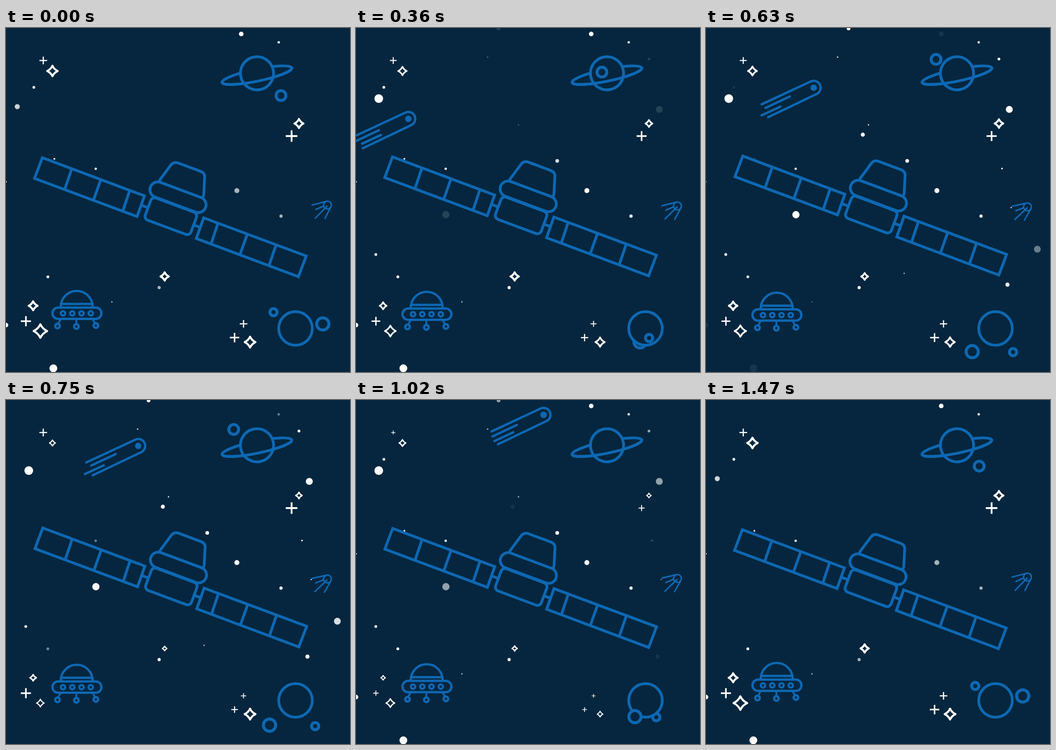
Animation, 748 px wide and 748 px high, one loop 1.5 s. Source, as an HTML page:

```html
<!DOCTYPE html>
<html lang="en">
<head>
<meta charset="utf-8">
<title>Satellite in space</title>
<style>
  html, body { margin: 0; width: 100%; height: 100%; overflow: hidden; background: #05263e; }
  svg { display: block; width: 100vw; height: 100vh; }
  .line { fill: none; stroke: #0d68b3; }
  .solid { fill: #05263e; }
</style>
</head>
<body>
<svg viewBox="0 0 748 748">
  <g id="stars" fill="#fff"></g>
  <g id="sparks" fill="none" stroke="#fff" stroke-linejoin="round"></g>

  <g id="comet" class="line" stroke-width="5" stroke-linecap="round">
    <path d="M-113 36L-6.4 -13.6A15 15 0 0 1 6.4 13.6L-99 64"/>
    <path id="trailA" d="M-109 46L-56 21"/>
    <path id="trailB" d="M-109 58L-68 39"/>
    <circle r="7" fill="#0d68b3" stroke="none"/>
  </g>

  <g id="ringed" class="line" stroke-width="6">
    <g transform="translate(545.6 102.6) rotate(-11.7)">
      <ellipse rx="77.500" ry="13"/>
      <circle class="solid" cx="1" cy="-4" r="36"/>
      <path d="M-77.500 0A77.500 13 0 0 0 77.500 0"/>
    </g>
  </g>

  <g id="plain" class="line" stroke-width="6">
    <circle class="solid" cx="629.500" cy="653.300" r="36.500"/>
  </g>

  <g id="probe" class="line" stroke-width="3.2" stroke-linecap="round">
    <circle cx="699" cy="385" r="8.500"/>
    <path d="M665.500 385L696 377M674 394.500L690 387.500M672.500 413.500L698 387.500M693.500 414L706.500 389"/>
  </g>

  <g id="ufo" class="line" stroke-width="5">
    <path d="M119 608V606.500A34.700 34.700 0 0 1 188.500 606.500V608M120 600H188"/>
    <rect x="101" y="608" width="106.500" height="24.500" rx="12.200"/>
    <g id="windows" stroke-width="4.600"></g>
    <path d="M119 633L114 642M153 633V643M188 633L193 641" stroke-width="4"/>
    <circle cx="112" cy="648" r="5"/>
    <circle cx="153" cy="649" r="5"/>
    <circle cx="195.500" cy="647" r="5"/>
  </g>

  <g id="station" class="line" stroke-width="6">
    <path id="panel" d="M79 282L301 365L285 410L62 327ZM143 306L128 350M206 330L190 375M269 353L254 398"/>
    <use href="#panel" transform="rotate(180 357.400 411.400)"/>
    <path d="M295 385.500L308 390.500M408 428.500L421 433"/>
    <rect width="106" height="51.500" rx="9" transform="translate(317.800 366.600) rotate(20.400)"/>
    <rect x="-64" y="-17" width="128" height="34" rx="17" transform="translate(374 368) rotate(20.400)"/>
    <path d="M336 335.500Q332 333.500 335 329.500L358 298.500Q364 290.500 373 293L424 312Q432 315.500 432 323L430 362Q429 370 424 368.500"/>
  </g>
</svg>
<script>
const LOOP = 1500, HALF = 750, MID = 735, FADE = 200;
const $ = id => document.getElementById(id);
const clamp = v => Math.max(0, Math.min(1, v));

function add(parent, tag, attrs) {
  const el = document.createElementNS("http://www.w3.org/2000/svg", tag);
  for (const k in attrs) el.setAttribute(k, attrs[k]);
  return parent.appendChild(el);
}
const move = (el, x, y, extra = "") => el.setAttribute("transform", `translate(${x} ${y}) ${extra}`);

let seed = 11;
const random = () => (seed = seed * 16807 % 2147483647) / 2147483647;

for (let i = 0; i < 4; i++) add($("windows"), "circle", { cx: 124 + i * 20.1, cy: 620.5, r: 4.8 });

// Stars go out (1) or light up (-1) within a given time of mid-loop
const stars = [];
function addStars(sign, edge, ...dots) {
  for (const [cx, cy, r] of dots)
    stars.push({ el: add($("stars"), "circle", { cx, cy, r }), sign, edge });
}
addStars(1, 575, [24.5, 171, 5.5]);
addStars(1, 90, [511.5, 13, 5], [60.5, 129, 3], [0, 646, 5], [103, 740, 8.5]);
addStars(1, -70, [593, 31, 2.6], [195, 306, 2.6], [91, 541, 3.1]);
addStars(-1, 865, [502, 353.5, 5.4], [598, 409, 3.5], [333, 564.5, 3.4]);
addStars(-1, 655, [49.5, 153.5, 9.4], [43, 492.5, 3]);
addStars(-1, 540, [437.5, 289, 4]);
addStars(-1, 400, [310, 1, 4], [637, 67.5, 3], [659.5, 177, 7.6], [195.5, 406, 7.9]);
addStars(-1, 300, [341, 232, 4.4], [655.5, 558, 4.5]);
addStars(-1, 185, [720.5, 481, 7.4]);
for (let i = 0; i < 9; i++) {
  const dot = [random() * 748, random() * 748, 1.2 + random() * 1.2];
  if (i % 3) addStars(-1, 150 + random() * 400, dot);
  else addStars(1, random() * 100, dot);
}

const cross = h => ({ d: `M${-h} 0H${h}M0 ${-h}V${h}`, "stroke-width": h * .31 });
function diamond(h) {
  const width = 4.4, a = h - width / 2, k = a * .32;
  return {
    d: `M0 ${-a}Q${k} ${-k} ${a} 0Q${k} ${k} 0 ${a}Q${-k} ${k} ${-a} 0Q${-k} ${-k} 0 ${-a}Z`,
    "stroke-width": width
  };
}

// Each spark shrinks twice per loop: a short dip, then a deeper, longer one
const sparks = [];
function addSparks(shape, dip, depth, ...spots) {
  for (const [x, y, h] of spots)
    sparks.push({ el: add($("sparks"), "path", shape(h)), x, y, dip, depth });
}
addSparks(diamond, 240, .35, [101, 93.5, 13.7], [74.7, 659, 17]);
addSparks(diamond, 240, 0, [345, 540.3, 11.2]);
addSparks(diamond, 300, .25, [637, 207.7, 12], [59, 604, 12]);
addSparks(diamond, 490, .28, [530.7, 683, 14]);
addSparks(cross, 300, .25, [516.5, 643.3, 8.3], [497, 673.2, 10.2]);
addSparks(cross, 490, .28, [81, 70.7, 8.4], [621, 235, 12.6], [43.3, 637.5, 11]);

const bump = (t, at, reach) => Math.cos(Math.PI / 2 * Math.min(1, Math.abs(t - at) / reach)) ** 2;
const sparkSize = (s, t) => 1 - s.depth * bump(t, s.dip, 260) - .58 * bump(t, s.dip + 630, 365);

// Quick departure, gentle arrival
function easeOut(u) {
  let lo = 0, hi = 1, s = .5;
  const at = (s, p, q) => 3 * p * s * (1 - s) ** 2 + 3 * q * s * s * (1 - s) + s ** 3;
  for (let i = 0; i < 24; i++) {
    s = (lo + hi) / 2;
    if (at(s, .167, .667) < u) lo = s; else hi = s;
  }
  return at(s, .167, 1);
}

function makeMoon(home, r, from, to, frontFirst, back) {
  const el = add(home, "circle", { r, class: "solid", "stroke-width": 6.4 });
  return { el, home, from, to, frontFirst, back };
}
const moons = [
  makeMoon($("ringed"), 10.7, [598, 147], [495, 64], true, u => 1 - u),
  makeMoon($("plain"), 13.3, [689, 643.3], [573, 707], false, u => (1 + Math.cos(Math.PI * u)) / 2),
  makeMoon($("plain"), 7.8, [581.5, 617.8], [672.3, 709.3], true, u => easeOut(1 - u))
];

function placeMoon(m, t) {
  const out = t < HALF, front = out === m.frontFirst;
  const f = out ? easeOut(t / HALF) : m.back((t - HALF) / HALF);
  move(m.el, m.from[0] + (m.to[0] - m.from[0]) * f, m.from[1] + (m.to[1] - m.from[1]) * f);
  if (m.front !== front) {
    m.front = front;
    m.home.insertBefore(m.el, front ? null : m.home.firstChild);
  }
}

function draw(t) {
  const away = Math.abs(t - MID);
  for (const s of stars) s.el.setAttribute("opacity", clamp(s.sign * (away - s.edge) / FADE));
  for (const s of sparks) move(s.el, s.x, s.y, `scale(${sparkSize(s, t)})`);
  for (const m of moons) placeMoon(m, t);

  const bob = (1 - Math.cos(2 * Math.PI * t / LOOP)) / 2;
  move($("station"), bob, -3.8 * bob);
  move($("ufo"), 0, 4 * bob);
  move($("probe"), 0, 4.2 * bob, `rotate(${2.2 * bob} 699 385)`);

  const flight = t - 510;
  move($("comet"), 180.2 + .4455 * flight, 160.2 - .2505 * flight);
  const slip = -1.5 + 8.5 * Math.sin(2 * Math.PI * flight / 1000);
  move($("trailA"), slip, -.467 * slip);
  move($("trailB"), -slip, .467 * slip);
}

const start = performance.now();
function tick() {
  draw((performance.now() - start) % LOOP);
  requestAnimationFrame(tick);
}
draw(0);
requestAnimationFrame(tick);
</script>
</body>
</html>
```
